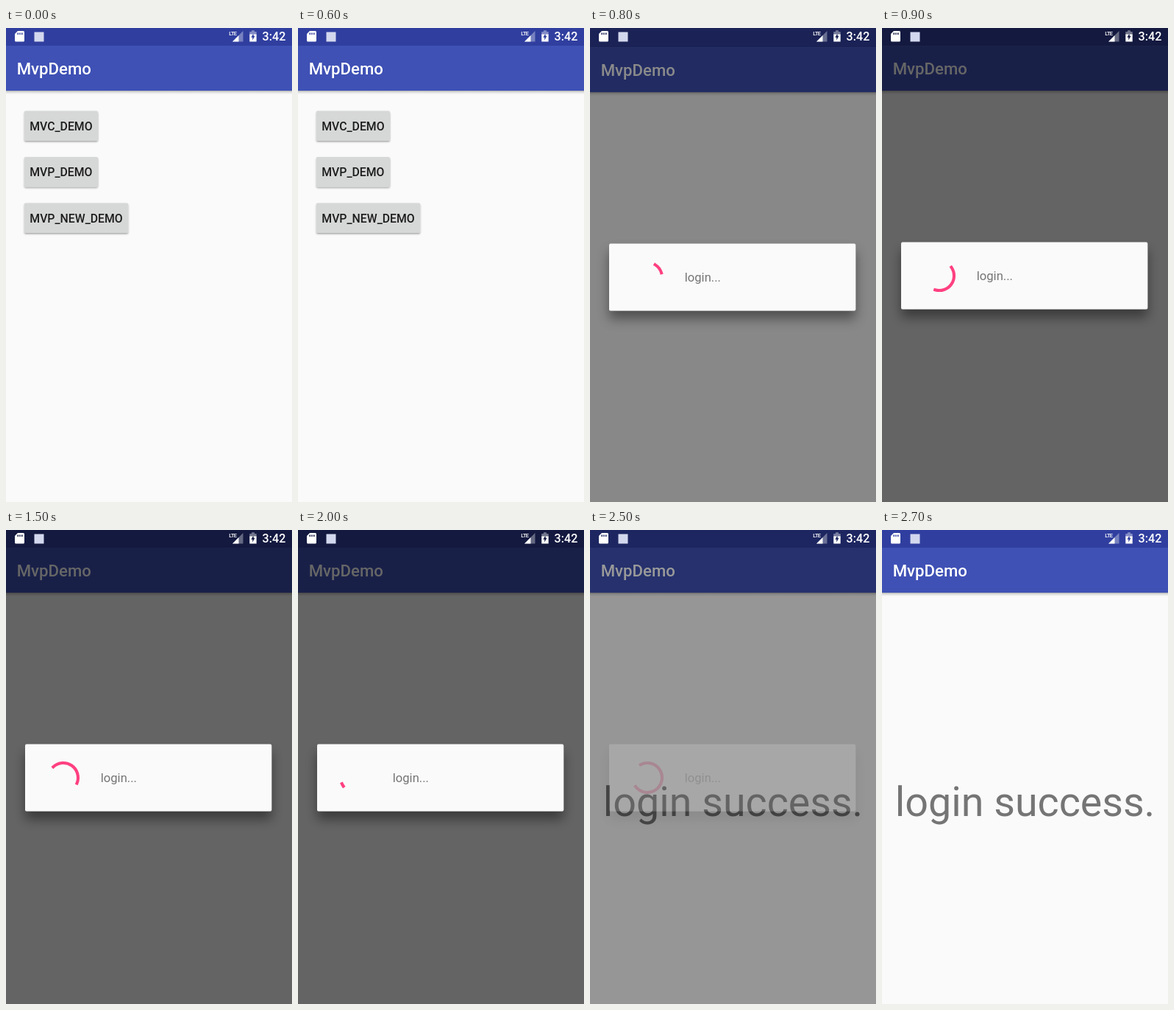
Write an HTML page that moves like this. It is 389 by 643 pixels and loops after 3300 ms.

```html
<!DOCTYPE html>
<html lang="en">
<head>
<meta charset="utf-8">
<title>MvpDemo</title>
<style>
  html, body { margin: 0; width: 100%; height: 100%; overflow: hidden; background: #fafafa; }
  svg { display: block; width: 389px; height: 643px; font-family: Roboto, sans-serif; }
  .mid { text-anchor: middle; }
  .bold { font-weight: 500; }
</style>
</head>
<body>
<svg viewBox="0 0 389 643">
  <defs>
    <linearGradient id="fade" x2="0" y2="1">
      <stop offset="0" stop-color="#000" stop-opacity=".3"/>
      <stop offset=".4" stop-color="#000" stop-opacity=".11"/>
      <stop offset="1" stop-color="#000" stop-opacity="0"/>
    </linearGradient>
    <filter id="low" x="-10%" y="-20%" width="120%" height="150%">
      <feDropShadow dx="0" dy="1.4" stdDeviation="0.9" flood-opacity=".36"/>
    </filter>
    <filter id="high" x="-15%" y="-40%" width="130%" height="200%">
      <feDropShadow dx="0" dy="11" stdDeviation="8" flood-opacity=".42"/>
    </filter>
    <g id="screen">
      <rect width="389" height="643" fill="#fafafa"/>
      <rect width="389" height="24" fill="#303f9f"/>
      <rect y="24" width="389" height="61" fill="#3f51b5"/>
      <rect y="85" width="389" height="5" fill="url(#fade)"/>
      <text class="bold" x="14.7" y="63.3" font-size="22.2" fill="#fff">MvpDemo</text>
    </g>
  </defs>

  <g id="home"><use href="#screen"/></g>

  <g id="next">
    <use href="#screen"/>
    <text id="done" class="mid" x="194.5" y="387.5" font-size="55.6" fill="#757575">login success.</text>
  </g>

  <rect id="dim" width="389" height="643"/>

  <g id="dialog">
    <rect x="26" y="290.5" width="335.3" height="91" rx="2" fill="#fafafa" filter="url(#high)"/>
    <path id="arc" fill="none" stroke="#ff4081" stroke-width="4.1" stroke-linecap="square"/>
    <text x="128.8" y="342" font-size="16.6" fill="#757575">login...</text>
  </g>

  <g fill="#fff">
    <path fill-rule="evenodd" d="M16 4H23.5Q25 4 25 5.5V17Q25 18.500 23.500 18.500H13.500Q12 18.500 12 17V8Z
      M15.500 6.500V9H17V6.500ZM18.200 6.500V9H19.700V6.500ZM21 6.500V9H22.500V6.500Z"/>
    <rect x="38.500" y="5.500" width="13" height="13" fill="#d3d8ee"/>
    <text class="bold" x="303.200" y="10" font-size="7.500" letter-spacing="-.6">LTE</text>
    <path d="M308 18.500L322.500 4V18.500Z" opacity=".35"/>
    <path d="M308 18.500L316.500 10V18.500Z"/>
    <path d="M331.300 5H334V3.300H338V5H340.700V9.500H331.300Z" opacity=".4"/>
    <path fill-rule="evenodd" d="M331.300 8.500H340.700V18.500H331.300Z
      M336.800 8.500V10.800H338.600L335.300 16.500V12.700H333.400L335.800 8.500Z"/>
    <text class="bold" x="348.500" y="17.200" font-size="16.200">3:42</text>
  </g>
</svg>
<script>
const LOOP = 3300, STEP = 100;
const OPEN = 634, CLOSE = 2400;
const $ = id => document.getElementById(id);
const clamp = x => Math.min(1, Math.max(0, x));
const easeOut = (x, power) => 1 - (1 - clamp(x)) ** power;

function addButton(y, width, label) {
  $('home').insertAdjacentHTML('beforeend',
    `<rect x="24.800" y="${y}" width="${width}" height="40.500" rx="2" fill="#d6d7d7" filter="url(#low)"/>
     <text class="mid bold" x="${24.8 + width / 2}" y="${y + 26.2}" font-size="15.800" fill="#1c1c1c">${label}</text>`);
}
addButton(112.5, 100.2, 'MVC_DEMO');
addButton(175, 100.2, 'MVP_DEMO');
addButton(237.5, 141.5, 'MVP_NEW_DEMO');

// Bezier ease that runs over the first half of its input
function trim(x) {
  if (x <= 0) return 0;
  if (x >= 0.5) return 1;
  let lo = 0, hi = 1;
  for (let i = 0; i < 24; i++) {
    const m = (lo + hi) / 2, n = 1 - m;
    if (0.6 * m * n * n + 0.3 * m * m * n + 0.5 * m ** 3 < x) lo = m; else hi = m;
  }
  return lo * lo * (3 - 2 * lo);
}

function point(deg) {
  const a = deg * Math.PI / 180;
  return `${(78 + 20 * Math.sin(a)).toFixed(3)} ${(336 - 20 * Math.cos(a)).toFixed(3)}`;
}

function spinner(ms) {
  const p = ms / 1333 % 1;
  const base = ms * 720 / 4444 + 90 * p;
  const from = base + 270 * trim(p - 0.5);
  const to = Math.max(base + 270 * trim(p), from + 0.5);
  $('arc').setAttribute('d',
    `M${point(from)}A20 20 0 ${to - from > 180 ? 1 : 0} 1 ${point(to)}`);
}

function show(id, opacity) {
  $(id).setAttribute('opacity', opacity);
  $(id).style.display = opacity > 0 ? '' : 'none';
}

function draw(t) {
  const age = t - OPEN, left = t - CLOSE;
  const shift = 51 * (1 - easeOut(age / 350, 5));
  show('next', easeOut(age / 200, 4));
  $('next').setAttribute('transform', `translate(0 ${shift})`);
  show('done', left > 0 ? 1 : 0);

  const dimIn = clamp((t - 647) / 200), dimOut = clamp(left / 300);
  show('dim', 0.6 * dimIn * (1 - dimOut));

  const fadeIn = easeOut((t - 660) / 160, 3);
  const fadeOut = (1 - clamp(left / 170)) ** 2;
  show('dialog', fadeIn * fadeOut);
  $('dialog').setAttribute('transform', `translate(0 ${shift})`);

  const live = Math.min(t, CLOSE);
  spinner(Math.max(0, live < 900 ? live - 660 : 240 + (live - 900) * 1.068));
}

const start = performance.now();
function tick() {
  const t = (performance.now() - start) % LOOP;
  draw(Math.floor(t / STEP) * STEP);
  requestAnimationFrame(tick);
}
tick();
</script>
</body>
</html>
```
